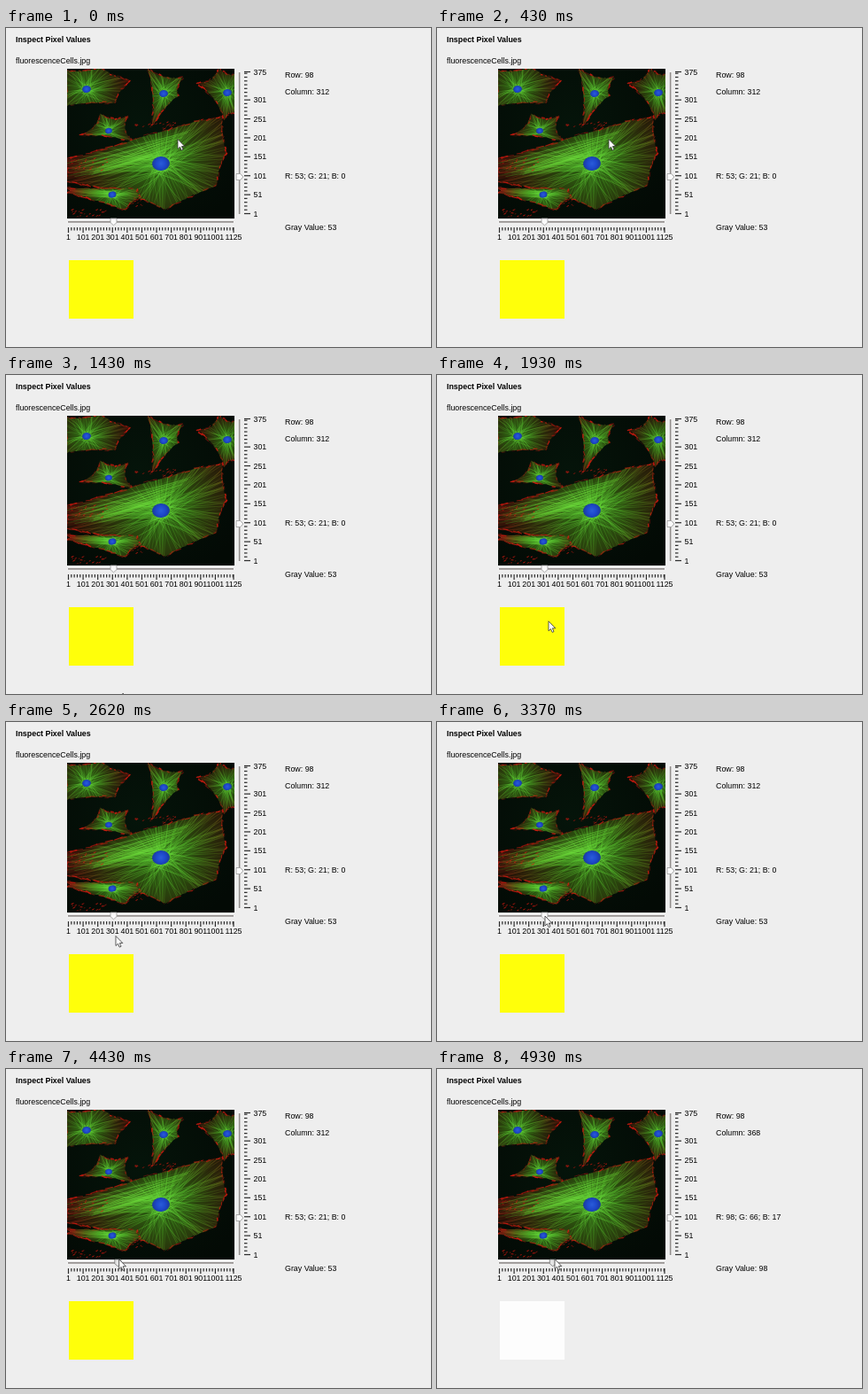
An HTML page with a canvas for the animation above (5 s loop, 480 by 360 pixels).

```html
<!DOCTYPE html>
<html lang="en">
<head>
<meta charset="utf-8">
<title>Inspect Pixel Values</title>
<style>
html, body { margin: 0; width: 100%; height: 100%; overflow: hidden; background: #eee; }
canvas { display: block; width: 480px; height: 360px; }
</style>
</head>
<body>
<canvas id="stage"></canvas>
<script>
const LOOP = 5000;
const HIDE = 500, ENTER = 1400, GRAB = 3870, DRAG = 4150, RELEASE = 4700;
const FONT = '8.87px "Liberation Sans", Arial, sans-serif';
const ratio = window.devicePixelRatio || 1;

function sizeCanvas(canvas) {
  canvas.width = 480 * ratio;
  canvas.height = 360 * ratio;
  const context = canvas.getContext('2d');
  context.scale(ratio, ratio);
  return context;
}

const ctx = sizeCanvas(document.getElementById('stage'));
const backdrop = document.createElement('canvas');

let seed = 11;
function random() {
  seed = (seed * 16807) % 2147483647;
  return seed / 2147483647;
}
const jitter = amount => (random() - 0.5) * 2 * amount;
const mix = (a, b, k) => a + (b - a) * k;
const smooth = k => k * k * (3 - 2 * k);

// Micrograph: each cell stretches arms from its nucleus to a few tips.

function edgePoint({ x, y, pull, tips }, s) {
  const n = tips.length, i = Math.floor(s) % n, k = s - Math.floor(s);
  const [ax, ay] = tips[i], [bx, by] = tips[(i + 1) % n];
  const cx = mix((ax + bx) / 2, x, pull), cy = mix((ay + by) / 2, y, pull);
  return [mix(mix(ax, cx, k), mix(cx, bx, k), k), mix(mix(ay, cy, k), mix(cy, by, k), k)];
}

function cellPath(g, cell) {
  g.beginPath();
  for (let s = 0; s < cell.tips.length; s += 0.05) {
    const [x, y] = edgePoint(cell, s);
    g.lineTo(x + jitter(0.7), y + jitter(0.7));
  }
  g.closePath();
}

function radial(g, x, y, radius, ...colors) {
  const fill = g.createRadialGradient(x, y, 0, x, y, radius);
  colors.forEach((color, i) => fill.addColorStop(i / (colors.length - 1), color));
  return fill;
}

function fibre(g, ax, ay, bx, by, bend) {
  g.globalAlpha = 0.15 + random() * 0.5;
  g.lineWidth = 0.3 + random() * 0.6;
  g.beginPath();
  g.moveTo(ax, ay);
  g.quadraticCurveTo((ax + bx) / 2 + jitter(3), (ay + by) / 2 + bend + jitter(3), bx, by);
  g.stroke();
}

function rim(g, cell) {
  for (let s = 0; s < cell.tips.length; s += 0.06) {
    if (random() < 0.4) continue;
    const [ax, ay] = edgePoint(cell, s), [bx, by] = edgePoint(cell, s + 0.09);
    g.globalAlpha = 0.3 + random() * 0.6;
    g.lineWidth = 0.4 + random() * 1.3;
    g.beginPath();
    g.moveTo(ax + jitter(1.2), ay + jitter(1.2));
    g.lineTo(bx + jitter(1.2), by + jitter(1.2));
    g.stroke();
  }
}

function specks(g, x, y, rx, ry, count) {
  for (let i = 0; i < count; i++) {
    g.globalAlpha = 0.3 + random() * 0.6;
    g.beginPath();
    g.ellipse(x + jitter(rx), y + jitter(ry), 0.5 + random() * 1.6, 0.5, -0.5, 0, 7);
    g.fill();
  }
}

function drawCell(g, cell) {
  const { x, y, size, reach, tips } = cell;
  g.save();
  cellPath(g, cell);
  g.clip();
  g.fillStyle = radial(g, x, y, reach, '#2c6a14', '#2a4a0e', '#28260a', '#241006');
  g.fillRect(60, 40, 210, 190);
  g.strokeStyle = radial(g, x, y, reach, '#6ae03c', '#50b428', '#5a7418', '#8a2412');
  for (let i = 0; i < reach * 2.6; i++) {
    const [bx, by] = edgePoint(cell, random() * tips.length);
    fibre(g, x + jitter(size), y + jitter(size), bx, by, jitter(reach / 15));
  }
  g.restore();
  g.strokeStyle = '#d21a10';
  rim(g, cell);
  g.globalAlpha = 1;
}

function drawNucleus(g, { x, y, size }) {
  g.fillStyle = radial(g, x, y, size, '#2a5cd8', '#1d49cc', '#1a3a96');
  g.beginPath();
  g.ellipse(x, y, size, size * 0.8, -0.1, 0, 7);
  g.fill();
}

const cells = [
  { x: 91, y: 69, size: 5, reach: 46, pull: 0.2,
    tips: [[66, 48], [108, 44], [142, 59], [124, 85], [66, 88]] },
  { x: 178, y: 74, size: 5, reach: 40, pull: 0.4,
    tips: [[160, 46], [200, 55], [195, 77], [165, 112]] },
  { x: 116, y: 116, size: 4, reach: 30, pull: 0.5,
    tips: [[106, 96], [138, 99], [144, 128], [83, 121]] },
  { x: 250, y: 73, size: 5, reach: 34, pull: 0.4,
    tips: [[216, 62], [240, 44], [262, 50], [262, 100], [247, 104]] },
  { x: 175, y: 153, size: 10, reach: 98, pull: 0.06,
    tips: [[66, 149], [158, 121], [217, 104], [245, 99], [249, 140], [238, 178], [180, 205],
      [130, 186], [66, 174]] },
  { x: 120, y: 188, size: 4.5, reach: 46, pull: 0.2,
    tips: [[66, 180], [150, 181], [153, 190], [135, 206], [66, 186]] }
];

// Bright bundle arching over the large nucleus.
function drawBundle(g) {
  g.strokeStyle = radial(g, 150, 142, 80, '#74e83e', '#5cc82e', '#4c7a18');
  for (let i = 0; i < 55; i++) {
    const k = random();
    fibre(g, 90 + jitter(22), mix(150, 168, k), mix(212, 176, k), mix(112, 144, k), 2);
  }
}

function drawMicrograph(g) {
  g.save();
  g.beginPath();
  g.rect(69, 46, 189, 169);
  g.clip();
  g.fillStyle = radial(g, 150, 110, 130, '#05140a', '#030a05');
  g.fillRect(69, 46, 189, 169);
  cells.forEach(cell => drawCell(g, cell));
  drawBundle(g);
  g.fillStyle = '#d81a12';
  specks(g, 94, 154, 22, 7, 28);
  specks(g, 170, 110, 24, 4, 28);
  specks(g, 95, 209, 22, 4, 22);
  specks(g, 146, 196, 9, 5, 12);
  g.globalAlpha = 1;
  cells.forEach(cell => drawNucleus(g, cell));
  g.restore();
}

// Interface

function label(g, text, x, y, align = 'left', weight = '') {
  g.font = `${weight} ${FONT}`;
  g.textAlign = align;
  g.fillStyle = '#000';
  g.fillText(text, x, y);
}

const columnX = value => 70.5 + (value - 1) / 1124 * 186.5;
const rowY = value => 209.5 - (value - 1) / 374 * 160;

// The last regular step gives way to the end value.
function drawAxis(max, minor, major, drawTick) {
  for (let v = 1; v < max; v += minor) {
    drawTick(v, v % major === 1 && v + major / 2 <= max);
  }
  drawTick(max, true);
}

function columnTick(v, major) {
  g_fillTick(columnX(v) - 0.6, 225, 1.2, major ? 6 : 3.5);
  if (major) label(back, v, columnX(v), 239, 'center');
}

function rowTick(v, major) {
  g_fillTick(269, rowY(v) - 0.6, major ? 7 : 3.5, 1.2);
  if (major) label(back, v, 279.5, rowY(v) + 3.1);
}

function g_fillTick(x, y, width, height) {
  back.fillStyle = '#2c2c2c';
  back.fillRect(x, y, width, height);
}

function drawTrack(g, x, y, width, height) {
  g.fillStyle = '#fafafa';
  g.fillRect(x - 0.5, y - 0.5, width + 1, height + 1);
  g.fillStyle = '#938f8d';
  g.fillRect(x, y, width, height);
}

function drawShape(g, points, fill, stroke) {
  g.beginPath();
  points.forEach(([x, y]) => g.lineTo(x, y));
  g.closePath();
  g.fillStyle = fill;
  g.fill();
  g.strokeStyle = stroke;
  g.lineWidth = 0.8;
  g.stroke();
}

function drawThumb(g, x, y, angle, held) {
  g.save();
  g.translate(x, y);
  g.rotate(angle);
  drawShape(g, [[-3.5, -3.5], [3.5, -3.5], [3.5, 1.3], [0, 4.3], [-3.5, 1.3]],
    held ? '#e4e4e4' : '#fafafa', held ? '#777' : '#9a9a9a');
  g.restore();
}

function drawPointer(x, y) {
  ctx.save();
  ctx.translate(x, y);
  drawShape(ctx, [[0, 0], [0, 11], [2.5, 8.7], [4.2, 12.6], [6, 11.8], [4.4, 8], [7.8, 8]],
    '#fff', '#333');
  ctx.restore();
}

const back = sizeCanvas(backdrop);

function drawBackdrop() {
  back.fillStyle = '#eeeeee';
  back.fillRect(0, 0, 480, 360);
  label(back, 'Inspect Pixel Values', 11, 16, 'left', 'bold');
  label(back, 'fluorescenceCells.jpg', 11, 39.5);
  label(back, 'Row: 98', 315, 55.5);
  drawMicrograph(back);
  drawTrack(back, 70, 218, 187, 1.7);
  drawTrack(back, 262.8, 50, 1.7, 160);
  drawAxis(1125, 20, 100, columnTick);
  drawAxis(375, 10, 50, rowTick);
  drawThumb(back, 263.5, rowY(98), -Math.PI / 2, false);
}

// Pointer stops: time, x, y
const stops = [[ENTER, 132, 360], [1900, 126, 278], [2620, 124, 241.5], [3370, 122, 219],
  [DRAG, 122, 215], [RELEASE, 133, 214.5]];

function pointerAt(t) {
  if (t < HIDE) return [194, 125.5];
  if (t < ENTER) return null;
  const next = stops.findIndex(([time]) => time > t);
  if (next < 0) return stops[stops.length - 1].slice(1);
  const [t0, x0, y0] = stops[next - 1], [t1, x1, y1] = stops[next];
  const k = smooth((t - t0) / (t1 - t0));
  return [mix(x0, x1, k), mix(y0, y1, k)];
}

function draw(t) {
  const done = t >= RELEASE;
  const dragged = smooth(Math.min(1, Math.max(0, (t - DRAG) / (RELEASE - DRAG))));
  const pointer = pointerAt(t);
  ctx.drawImage(backdrop, 0, 0, 480, 360);
  label(ctx, `Column: ${done ? 368 : 312}`, 315, 75.2);
  label(ctx, done ? 'R: 98; G: 66; B: 17' : 'R: 53; G: 21; B: 0', 315, 170.2);
  label(ctx, `Gray Value: ${done ? 98 : 53}`, 315, 228.2);
  ctx.fillStyle = done ? '#fdfdfd' : '#ffff0a';
  ctx.fillRect(71, 262, 73, 66);
  drawThumb(ctx, columnX(mix(312, 368, dragged)) - 0.6, 218.4, 0, t > GRAB);
  if (pointer) drawPointer(...pointer);
}

drawBackdrop();
const start = performance.now();
function frame() {
  draw((performance.now() - start) % LOOP);
  requestAnimationFrame(frame);
}
frame();
</script>
</body>
</html>
```
